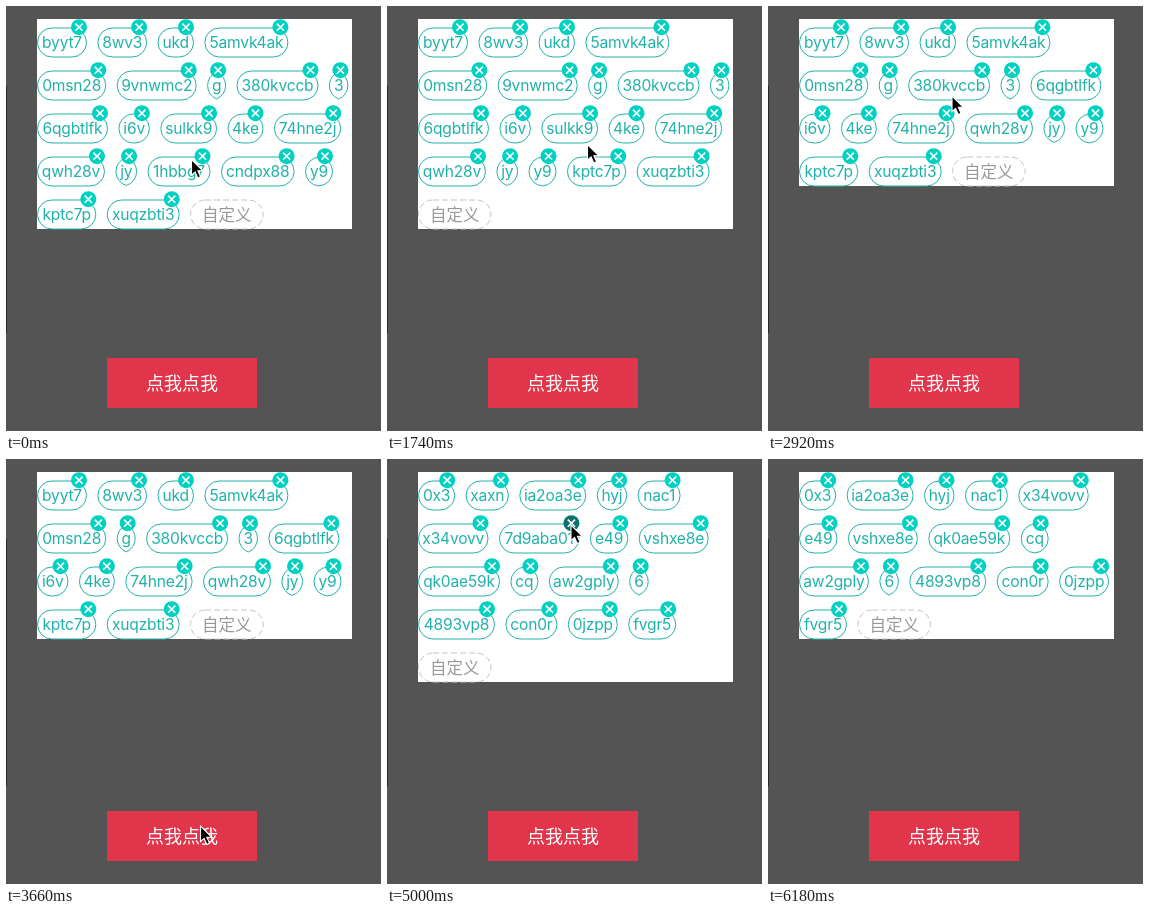
These frames come from a looping animation (375 px wide and 425 px high, 6.63 s). An HTML page:

```html
<!DOCTYPE html>
<html lang="zh">
<head>
<meta charset="utf-8">
<title>Tags</title>
<style>
  html, body { margin: 0; width: 100%; height: 100%; overflow: hidden; background: #545454; }
  svg { display: block; width: 375px; height: 425px; }
  text { text-anchor: middle; font-family: "Noto Sans CJK SC", "Noto Sans CJK", sans-serif; }
  .tag text { font: 15.6px Inter, Roboto, sans-serif; letter-spacing: -.2px; fill: #20b2aa; }
  .tag .pill { fill: #fff; stroke: #20b2aa; }
  .tag circle { fill: #00d1c1; }
  .tag.down circle { fill: #0a746d; }
  .tag .x { stroke: #fff; stroke-width: 1.6; }
  .custom text { font-size: 16.5px; fill: #999; }
  .custom .pill { fill: #fff; stroke: #c4c4c4; stroke-dasharray: 6 3; }
</style>
</head>
<body>
<svg viewBox="0 0 375 425">
  <rect width="375" height="425" fill="#545454"/>
  <rect y="80" width="1" height="247" fill="#26282e"/>
  <rect id="panel" x="31" y="13" width="315" fill="#fff"/>
  <g id="tags"></g>
  <rect x="101" y="352" width="150" height="50" fill="#e0354a"/>
  <text x="176" y="383.5" font-size="18" fill="#fff">点我点我</text>
  <path id="cursor" d="M0 0V15.6L3.6 12.3L6.3 18.4L9 17.2L6.4 11.3H11.4Z" fill="#000" stroke="#fff" stroke-width="1.1"/>
</svg>
<script>
const LOOP = 6630, LEFT = 31, RIGHT = 346, GAP = 10.4, ROW = 43;

// label:pill width
const parse = s => s.split(' ').map(p => {
  const [label, w] = p.split(':');
  return { label, w: +w };
});
const firstSet = parse('byyt7:50 8wv3:49.7 ukd:36.5 5amvk4ak:84 0msn28:69.3 9vnwmc2:80 g:19 380kvccb:82 3:19.5 ' +
  '6qgbtlfk:71 i6v:31.5 sulkk9:56.8 4ke:36 74hne2j:67.3 qwh28v:68 jy:21.7 1hbbg7:63 cndpx88:73.7 y9:28 ' +
  'kptc7p:59.3 xuqzbti3:73');
const secondSet = parse('0x3:37.2 xaxn:43.3 ia2oa3e:67 hyj:30.5 nac1:43 x34vovv:70.5 7d9aba01:80.5 e49:38.5 ' +
  'vshxe8e:70 qk0ae59k:82 f4cf:38 cq:28 aw2gply:70 6:19.5 4893vp8:77 con0r:52 0jzpp:50 fvgr5:48');
const custom = { label: '自定义', w: 73.5, custom: true };

// tick at which each tag disappears
const removed = { '1hbbg7': 3, cndpx88: 10, sulkk9: 16, '9vnwmc2': 20, f4cf: 32, '7d9aba01': 35, xaxn: 39 };
const REFRESH = 27, LEAVE = 42;

// tick, x, y of the pointer tip
const route = [[0, 185.5, 153.5], [2, 197, 151], [4, 206, 151], [9, 206, 151], [12, 200.5, 138.5],
  [14, 204, 107], [15, 204, 107], [18, 182.5, 64.5], [19, 183, 65], [20, 184, 90], [23, 194, 341],
  [25, 194.5, 367], [27, 194.5, 367], [29, 157.5, 120], [31, 155, 108], [33, 184, 66], [35, 184, 66],
  [37, 115, 22], [38, 113.5, 20.5], [39, 130, 80], [41, 268, 402], [42, 300, 430]];

const byId = id => document.getElementById(id);
const panel = byId('panel'), tags = byId('tags'), cursor = byId('cursor');

const tickAt = t => Math.floor(t < 552 ? t / 138 : 4 + (t - 552) / 147.65);

function pointer(tick) {
  let i = 1;
  while (i < route.length - 1 && route[i][0] < tick) i++;
  const [a, ax, ay] = route[i - 1], [b, bx, by] = route[i];
  const k = Math.min(1, (tick - a) / (b - a));
  return [ax + (bx - ax) * k, ay + (by - ay) * k];
}

// corner arcs of radius 15 cross each other on narrow pills
function pill(w) {
  const r = 14.5, iw = w - 1;
  if (iw >= 2 * r) return `<rect class="pill" x=".5" y=".5" width="${iw}" height="29" rx="${r}"/>`;
  const d = Math.sqrt(r * r - (r - iw / 2) ** 2), arc = `A${r} ${r} 0 0 0 ${w / 2} `;
  return `<path class="pill" d="M${w / 2} ${15 - d}${arc}${15 + d}${arc}${15 - d}Z"/>`;
}

function tagMarkup(tag, x, y, tick) {
  const down = removed[tag.label] === tick + 1;
  const cls = tag.custom ? 'custom' : down ? 'tag down' : 'tag';
  const close = tag.custom ? '' : `<g transform="translate(${tag.w - 8} -.3)"><circle r="8"/>` +
    '<path class="x" d="M-3.6 -3.6L3.6 3.6M3.6 -3.6L-3.6 3.6"/></g>';
  return `<g class="${cls}" transform="translate(${x} ${y})">${pill(tag.w)}` +
    `<text x="${tag.w / 2}" y="${tag.custom ? 21 : 20.5}">${tag.label}</text>${close}</g>`;
}

function layout(tick) {
  const live = (tick < REFRESH ? firstSet : secondSet).filter(t => !(removed[t.label] <= tick));
  let x = LEFT, y = 21.5, html = '';
  for (const tag of [...live, custom]) {
    if (x + tag.w > RIGHT) { x = LEFT; y += ROW; }
    html += tagMarkup(tag, x, y, tick);
    x += tag.w + GAP;
  }
  tags.innerHTML = html;
  panel.setAttribute('height', y + 30 - 13 - .5);
}

let last = -1;
function draw(now) {
  const tick = tickAt(now % LOOP);
  if (tick !== last) {
    last = tick;
    layout(tick);
    cursor.setAttribute('transform', `translate(${pointer(tick)})`);
    cursor.style.display = tick < LEAVE ? '' : 'none';
  }
}

const start = performance.now();
function frame() {
  draw(performance.now() - start);
  requestAnimationFrame(frame);
}
frame();
</script>
</body>
</html>
```
